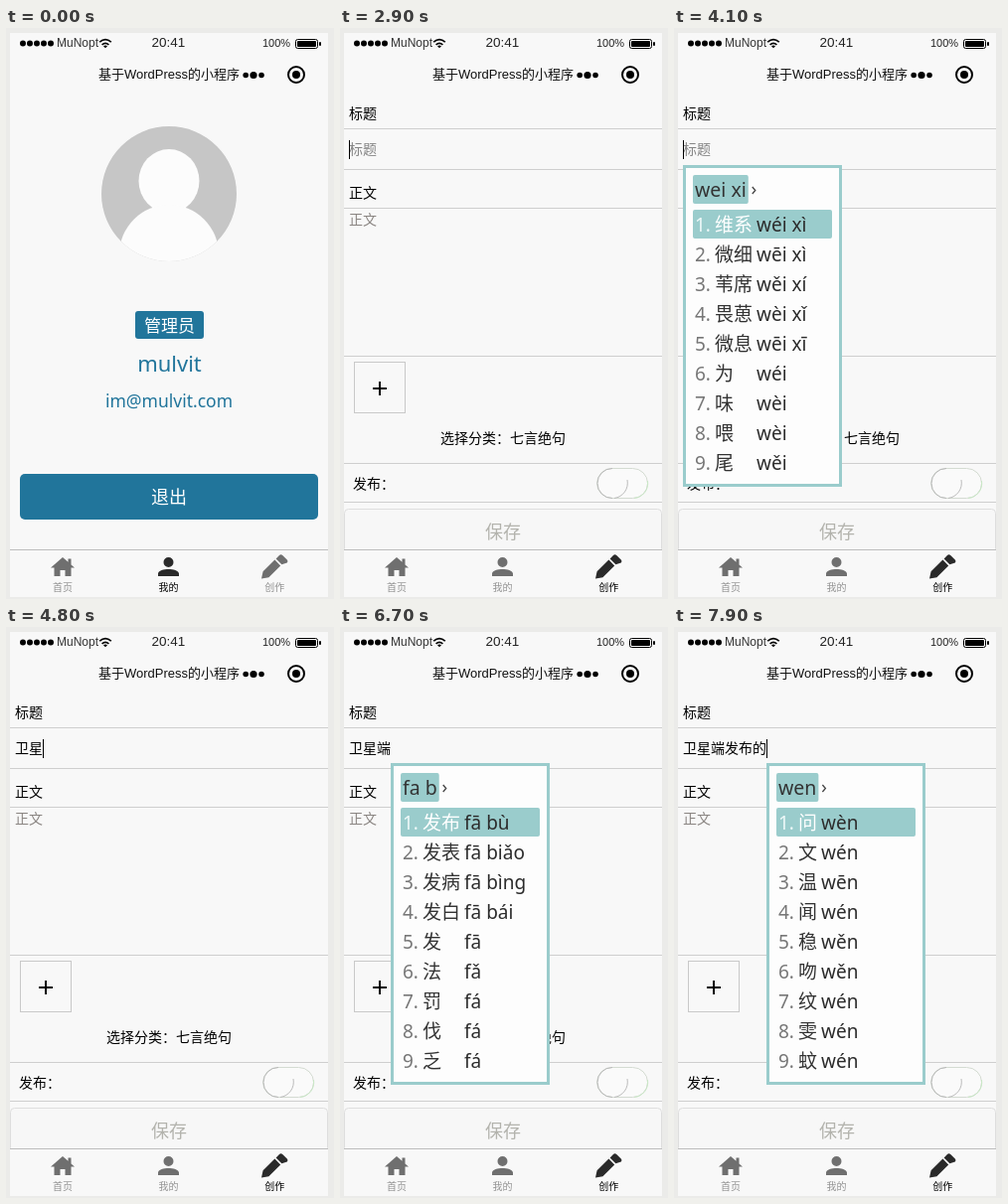
Recreate the animation shown at these times as an HTML page. Size 330 by 575 pixels, loop 8000 ms.

```html
<!DOCTYPE html>
<html lang="zh-CN">
<head>
<meta charset="utf-8">
<title>小程序</title>
<style>
html, body { margin: 0; width: 100%; height: 100%; overflow: hidden; background: #ebebe9; }
svg { display: block; width: 330px; height: 575px; }
text { font-family: "Liberation Sans", "Noto Sans CJK SC", "Noto Sans CJK", sans-serif; white-space: pre; }
.ui { font-family: "Noto Sans", "Noto Sans CJK SC", "Noto Sans CJK", sans-serif; }
.mid { text-anchor: middle; }
</style>
</head>
<body>
<svg id="stage" viewBox="0 0 330 575" xmlns="http://www.w3.org/2000/svg">
  <rect width="330" height="575" fill="#ebebe9"/>
  <rect x="4" y="5" width="320" height="568" fill="#f8f8f8"/>
  <g id="status"></g>
  <g id="page"></g>
  <g id="tabs"></g>
  <g id="popup"></g>
</svg>
<script>
const LOOP = 8000, BLUE = '#21759b', TEAL = '#9acccc';
const $ = id => document.getElementById(id);

const rect = (x, y, w, h, fill, more = '') =>
  `<rect x="${x}" y="${y}" width="${w}" height="${h}" fill="${fill}" ${more}/>`;
const dot = (x, y, r, fill = '#000', more = '') =>
  `<circle cx="${x}" cy="${y}" r="${r}" fill="${fill}" ${more}/>`;
const path = (d, more) => `<path d="${d}" ${more}/>`;
const text = (s, x, y, size, fill = '#000', cls = '', more = '') =>
  `<text x="${x}" y="${y}" font-size="${size}" fill="${fill}" class="${cls}" ${more}>${s}</text>`;
const rule = y => rect(4, y, 320, 1, '#cfcfcf');

function statusBar() {
  let s = '';
  for (let i = 0; i < 5; i++) s += dot(17 + 7 * i, 15.5, 3);
  const arc = 'fill="none" stroke="#000" stroke-width="1.7"';
  return s + text('MuNopt', 51, 19, 12, '#333') +
    path('M94.2 14.2Q100 9 105.8 14.2M96.6 16.8Q100 13.8 103.4 16.8', arc) +
    path('M98 18.2Q100 16.6 102 18.2L100 20.2Z', 'fill="#000"') +
    text('20:41', 163.5, 19, 13.5, '#222', 'mid') +
    text('100%', 258, 19, 11, '#222') +
    rect(291.5, 11.5, 22, 9, 'none', 'rx="2" stroke="#000"') +
    rect(293, 13, 19, 6, '#000', 'rx="1"') +
    rect(315, 14, 2, 4, '#000', 'rx="1"') +
    text('基于WordPress的小程序', 164, 51, 13, '#111', 'mid') +
    dot(241.2, 47.5, 2.8) + dot(249, 47.5, 3.6) + dot(257, 47.5, 2.8) +
    dot(292, 47, 8, 'none', 'stroke="#000" stroke-width="2"') + dot(292, 47, 4);
}

function profile() {
  return '<clipPath id="round"><circle cx="164" cy="167" r="68"/></clipPath>' +
    '<g clip-path="url(#round)">' + rect(96, 99, 136, 136, '#c6c6c6') +
    '<ellipse cx="164" cy="154" rx="30.5" ry="32" fill="#fcfcfc"/>' +
    dot(164, 228, 50, '#fcfcfc') + '</g>' +
    rect(130, 285, 69, 28, BLUE, 'rx="3"') +
    text('管理员', 164.5, 306, 17, '#fff', 'ui mid') +
    text('mulvit', 164.5, 346, 22, BLUE, 'ui mid') +
    text('im@mulvit.com', 164, 382, 17.5, BLUE, 'ui mid') +
    rect(14, 449, 300, 46, BLUE, 'rx="5"') +
    text('退出', 164, 479, 18, '#fff', 'ui mid');
}

function editor(typed, caret) {
  const x = 9 + 14 * typed.length;
  return text('标题', 9, 91, 14) + rule(101) +
    text(typed || '标题', 9, 127, 14, typed ? '#000' : '#858585') +
    (caret ? rect(x, 113, 1, 19, '#000') : '') + rule(142) +
    text('正文', 9, 171, 14) + rule(181) +
    text('正文', 9, 198, 14, '#8a8582') + rule(330) +
    rect(14.5, 336.5, 51, 51, 'none', 'stroke="#c9c9c9"') +
    rect(33, 362, 14, 2, '#000') + rect(39, 356, 2, 14, '#000') +
    text('选择分类：七言绝句', 164, 418, 14, '#000', 'mid') + rule(438) +
    text('发布：', 13, 464, 14) + rule(477) +
    rect(258.5, 443.5, 51, 30, '#fafafa', 'rx="15" stroke="#d4dbd2"') +
    path('M274 443.5A15 15 0 0 0 274 473.5', 'fill="none" stroke="#b9b9b9"') +
    path('M289 455A15.5 15.5 0 0 1 276 473.5', 'fill="none" stroke="#bcbcbc"') +
    path('M309.5 456A15 15 0 0 1 296 473.5', 'fill="none" stroke="#c9e8c6"') +
    rect(4.5, 484.5, 319, 44, '#f7f7f7', 'rx="4" stroke="#dedede"') +
    text('保存', 164, 514, 18, '#b3b3ad', 'ui mid');
}

const icons = [
  'M57 533L45 543.5H48.5V552H54.5V546H59.5V552H65.5V543.5H69L65.5 540.4V534.5H62.5V537.8Z',
  'M163.5 533A5 5 0 0 1 163.5 543A5 5 0 0 1 163.5 533ZM153 552V549.5C153 546.4 159 545 163.5 545S174 546.4 174 549.5V552Z',
  'M257 554.5L258.6 547.2L270.4 535.6L276.2 541.4L264.4 553.2ZM271.6 534.4L275 531Q276.6 529.6 278.2 531L282.8 535.6Q284.2 537.2 282.8 538.6L277.4 540.2Z'
];
const labels = ['首页', '我的', '创作'];

function tabBar(active) {
  let s = rect(4, 525, 320, 48, '#f8f8f8') + rect(4, 525, 320, 1, '#bdbdbd');
  labels.forEach((name, i) => {
    const on = active.includes(i);
    s += path(icons[i], `fill="${on ? '#2a2a2a' : '#6f6f6f'}"`) +
      text(name, 57 + 106.6 * i, 567, 10, on ? '#000' : '#929292', 'mid');
  });
  return s;
}

// Input method candidates for each typed syllable string
const words = {
  'w': '我 wǒ,为 wéi,无 wú,问 wèn,位 wèi,外 wài,玩 wán,万 wàn,完 wán',
  'we': '为 wéi,问 wèn,位 wèi,文 wén,未 wèi,温 wēn,味 wèi,喂 wèi,尾 wěi',
  'wei': '为 wéi,位 wèi,未 wèi,味 wèi,喂 wèi,尾 wěi,围 wéi,伟 wěi,胃 wèi',
  'wei x': '维修 wéi xiū,危险 wēi xiǎn,卫星 wèi xīng,维系 wéi xì,违宪 wéi xiàn,微小 wēi xiǎo,威胁 wēi xié,为 wéi,位 wèi',
  'wei xi': '维系 wéi xì,微细 wēi xì,苇席 wěi xí,畏葸 wèi xǐ,微息 wēi xī,为 wéi,味 wèi,喂 wèi,尾 wěi',
  'wei xin': '卫星 wèi xīn,违心 wéi xīn,唯心 wéi xīn,维新 wéi xīn,为 wéi,位 wèi,味 wèi,喂 wèi,尾 wěi',
  'wei xing': '卫星 wèi xīng,微型 wēi xíng,未醒 wèi xǐng,为 wéi,位 wèi,未 wèi,味 wèi,喂 wèi,尾 wěi',
  'd': '的 de,到 dào,都 dōu,打 dǎ,点 diǎn,带 dài,多 duō,得 dé,端 duān',
  'du': '都 dōu,读 dú,度 dù,毒 dú,独 dú,堵 dǔ,赌 dǔ,渡 dù,肚 dù',
  'duan': '端 duān,段 duàn,短 duǎn,断 duàn,锻 duàn,缎 duàn,煅 duàn,椴 duàn,簖 duàn',
  'f': '发 fā,放 fàng,分 fēn,付 fù,非 fēi,飞 fēi,份 fèn,风 fēng,饭 fàn',
  'fa': '发 fā,法 fǎ,罚 fá,伐 fá,乏 fá,阀 fá,筏 fá,砝 fǎ,珐 fà',
  'fa b': '发布 fā bù,发表 fā biǎo,发病 fā bìng,发白 fā bái,发 fā,法 fǎ,罚 fá,伐 fá,乏 fá',
  'fa bu': '发布 fā bù,法部 fǎ bù,发 fā,法 fǎ,罚 fá,伐 fá,乏 fá,阀 fá,筏 fá',
  'wen': '问 wèn,文 wén,温 wēn,闻 wén,稳 wěn,吻 wěn,纹 wén,雯 wén,蚊 wén'
};

function popup(key, typed) {
  if (!key) return '';
  const x = 9 + 14 * typed.length, y = typed ? 137 : 138;
  const w = key === 'wei x' ? 173 : 160;
  const rows = words[key].split(',').map(r => [r.slice(0, r.indexOf(' ')), r.slice(r.indexOf(' ') + 1)]);
  const col = x + 36 + 19 * Math.max(...rows.map(r => r[0].length));
  let s = rect(x + 1.5, y + 1.5, w - 3, 321, '#fdfdfd', `stroke="${TEAL}" stroke-width="3"`) +
    rect(x + 10, y + 10, 16, 29, TEAL, 'rx="2" id="chip"') +
    text(key, x + 12, y + 32, 19.5, '#333', 'ui', 'id="key"') +
    path(`M0 ${y + 22}l3 3.5l-3 3.5`, 'id="arrow" fill="none" stroke="#444" stroke-width="1.3"') +
    rect(x + 10, y + 45, w - 20, 29, TEAL, 'rx="2"');
  rows.forEach(([word, sound], i) => {
    const by = y + 67 + 30 * i;
    s += text(`${i + 1}.`, x + 12, by, 19, i ? '#777' : '#eef8f8', 'ui') +
      text(word, x + 32, by, 19, i ? '#333' : '#fff', 'ui') +
      text(sound, col, by, 19, '#2c2c2c', 'ui', 'font-weight="500"');
  });
  return s;
}

function fitChip() {
  const w = $('key').getComputedTextLength() + 4, chip = $('chip');
  chip.setAttribute('width', w);
  $('arrow').setAttribute('transform', `translate(${+chip.getAttribute('x') + w + 4} 0)`);
}

// Editor states: start, typed title, caret shown, syllables in the popup
const A = '卫星', B = A + '端', C = B + '发布', D = C + '的';
const steps = [
  [1300, '', 0], [2000, '', 1], [2400, '', 0], [2900, '', 1], [3400, '', 0],
  [3600, '', 0, 'w'], [3700, '', 0, 'we'], [3900, '', 1, 'wei'], [4000, '', 1, 'wei x'],
  [4100, '', 1, 'wei xi'], [4300, '', 1, 'wei xin'], [4400, '', 0, 'wei xing'],
  [4800, A, 1], [5000, A, 1, 'd'], [5100, A, 1, 'du'], [5300, A, 0, 'duan'], [5800, A, 1, 'duan'],
  [6100, B, 1], [6300, B, 1, 'f'], [6400, B, 1, 'fa'], [6600, B, 0, 'fa'],
  [6700, B, 0, 'fa b'], [6800, B, 0, 'fa bu'],
  [7100, C, 1], [7200, C, 1, 'd'],
  [7500, D, 1], [7600, D, 1, 'w'], [7700, D, 1, 'we'], [7900, D, 1, 'wen']
];

let shown = '';
function render(t) {
  const step = steps.findLast(s => s[0] <= t);
  const active = t < 1000 ? [1] : t < 1100 ? [1, 2] : [2];
  const state = (step ? step[0] : 0) + '/' + active;
  if (state === shown) return;
  shown = state;
  const [, typed, caret, key] = step || [];
  $('page').innerHTML = step ? editor(typed, caret) : profile();
  $('tabs').innerHTML = tabBar(active);
  $('popup').innerHTML = step ? popup(key, typed) : '';
  if (key) fitChip();
}

$('status').innerHTML = statusBar();
const start = performance.now();
function frame() {
  render((performance.now() - start) % LOOP);
  requestAnimationFrame(frame);
}
frame();
</script>
</body>
</html>
```
